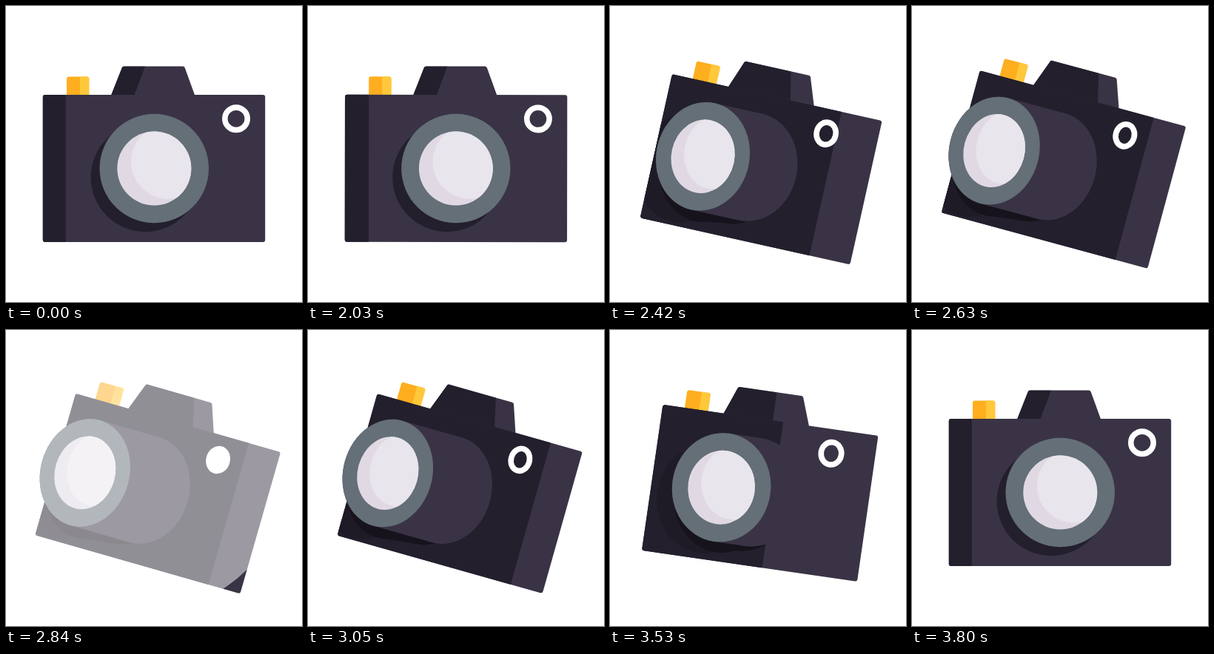
Animation of 400x400 px, one loop 3.83 s. Source, as an HTML page with a canvas:

```html
<!DOCTYPE html>
<html>
<head>
<meta charset="utf-8">
<style>
html, body { margin: 0; width: 100%; height: 100%; overflow: hidden; background: #fff; }
canvas { display: block; width: 400px; height: 400px; }
</style>
</head>
<body>
<canvas id="stage"></canvas>
<script>
const LOOP = 3830, START = 2000, HALF = 900, FIRST = 2030, STEP = 30;
const LIGHT = '#3a3345', DARK = '#231f2d';
const canvas = document.getElementById('stage');
const ctx = canvas.getContext('2d');
const dpr = window.devicePixelRatio || 1;
canvas.width = canvas.height = 400 * dpr;

const clamp = v => Math.max(0, Math.min(1, v));

// Cubic Bezier easing (0.3, 0, 0.15, 1), solved by bisection.
function ease(x) {
  let lo = 0, hi = 1, s = 0.5;
  for (let i = 0; i < 24; i++) {
    s = (lo + hi) / 2;
    const bx = 0.9 * s * (1 - s) ** 2 + 0.45 * s * s * (1 - s) + s ** 3;
    if (bx < x) lo = s; else hi = s;
  }
  return s * s * (3 - 2 * s);
}

// Polygon whose corners are [x, y, radius].
function poly(points) {
  const n = points.length, [a, b] = [points[n - 1], points[0]];
  ctx.beginPath();
  ctx.moveTo((a[0] + b[0]) / 2, (a[1] + b[1]) / 2);
  points.forEach(([x, y, r = 0], i) => {
    const next = points[(i + 1) % n];
    ctx.arcTo(x, y, next[0], next[1], r);
  });
  ctx.closePath();
}

function fill(color) {
  ctx.fillStyle = color;
  ctx.fill();
}

function rect(x0, y0, x1, y1, color) {
  ctx.fillStyle = color;
  ctx.fillRect(x0, y0, x1 - x0, y1 - y0);
}

function oval(x, y, rx, ry, color) {
  ctx.beginPath();
  ctx.ellipse(x, y, rx, ry, 0, 0, 2 * Math.PI);
  if (color) fill(color);
}

// Tube joining two equal ovals.
function tube(x0, y0, x1, y1, rx, ry, color) {
  oval(x0, y0, rx, ry, color);
  oval(x1, y1, rx, ry, color);
  poly([[x0, y0 - ry], [x1, y1 - ry], [x1, y1 + ry], [x0, y0 + ry]]);
  fill(color);
}

function clipped(paint) {
  ctx.save();
  ctx.clip();
  paint();
  ctx.restore();
}

function camera(p, flash) {
  const sweep = Math.min(1, p / 0.82);
  const w = 150.2 - 6.2 * p, h = 99.5;
  const edge = -w + 31 + 212.5 * sweep;
  const rx = 73.7 - 13.7 * p, ry = 73.7;
  const lens = 0.3 - 103 * p;

  ctx.save();
  ctx.translate(200 + 5.3 * p, 219.5 + 1.6 * p);
  ctx.rotate(16 * p * Math.PI / 180);

  // Shutter button
  const left = -118 + 1.5 * p, right = -87.7 + 4.7 * p;
  poly([[left, -124, 3], [right, -124, 3], [right, -97], [left, -97]]);
  fill('#ffae1f');
  clipped(() => rect(-100 + 5 * p, -130, right + 5, -90, '#ffc83a'));

  // Viewfinder
  poly([[-42.5 - 13.3 * p, -138, 3], [41 - 4.5 * p, -138, 3],
        [55.5 - 5 * p, -98], [-58.3 - 12.2 * p, -98]]);
  fill(LIGHT);
  clipped(() => {
    poly([[-100, -138], [-12 + 23.5 * sweep, -138], [-27 + 48 * sweep, -98], [-100, -98]]);
    fill(DARK);
  });

  // Body with side shade and lens shadow
  poly([[-w, -h, 3], [w, -h, 3], [w, h, 3], [-w, h, 3]]);
  fill(LIGHT);
  clipped(() => {
    rect(-w - 1, -h - 1, edge, h + 1, DARK);
    const sx = lens - 12 - 12 * p, sy = 12 + 12 * p;
    oval(sx, sy, rx, ry, DARK);
    ctx.beginPath();
    ctx.rect(-w, -h, edge + w, 2 * h);
    clipped(() => {
      oval(sx, sy, rx, ry, '#1e1a26');
      tube(-93 * p, 14, -42 * p, 8, rx, ry, '#17131c');
    });
  });

  // Lamp
  oval(111 - 45.5 * p, -67.2 + p, 15.2 - 2.8 * p, 15.2);
  if (flash > 0) {
    ctx.globalAlpha = flash;
    fill('#fff');
    ctx.globalAlpha = 1;
  }
  ctx.lineWidth = 7.6;
  ctx.strokeStyle = '#fff';
  ctx.stroke();

  // Lens
  tube(lens, 0, -18.5 * p, 0, rx, ry, LIGHT);
  oval(lens, 0, rx, ry, '#646f78');
  const k = rx / ry;
  oval(lens, 0, 50 * k, 50, '#e0d9e3');
  clipped(() => oval(lens + 18.7 * k, -9, 50 * k, 50, '#e9e5ec'));
  ctx.restore();

  if (flash > 0) oval(199.5, 199.5, 177, 177, `rgba(255,255,255,${flash / 2})`);
}

function draw(now) {
  const raw = now % LOOP;
  const t = raw < FIRST ? 0 : FIRST + STEP * Math.floor((raw - FIRST) / STEP);
  const p = ease(clamp(1 - Math.abs(t - START - HALF) / HALF));
  const flash = clamp(Math.min((t - 2720) / 90, (2960 - t) / 90));
  ctx.setTransform(dpr, 0, 0, dpr, 0, 0);
  rect(0, 0, 400, 400, '#fff');
  camera(p < 1e-5 ? 0 : p, flash);
}

const begin = performance.now();
function tick() {
  draw(performance.now() - begin);
  requestAnimationFrame(tick);
}
tick();
</script>
</body>
</html>
```
